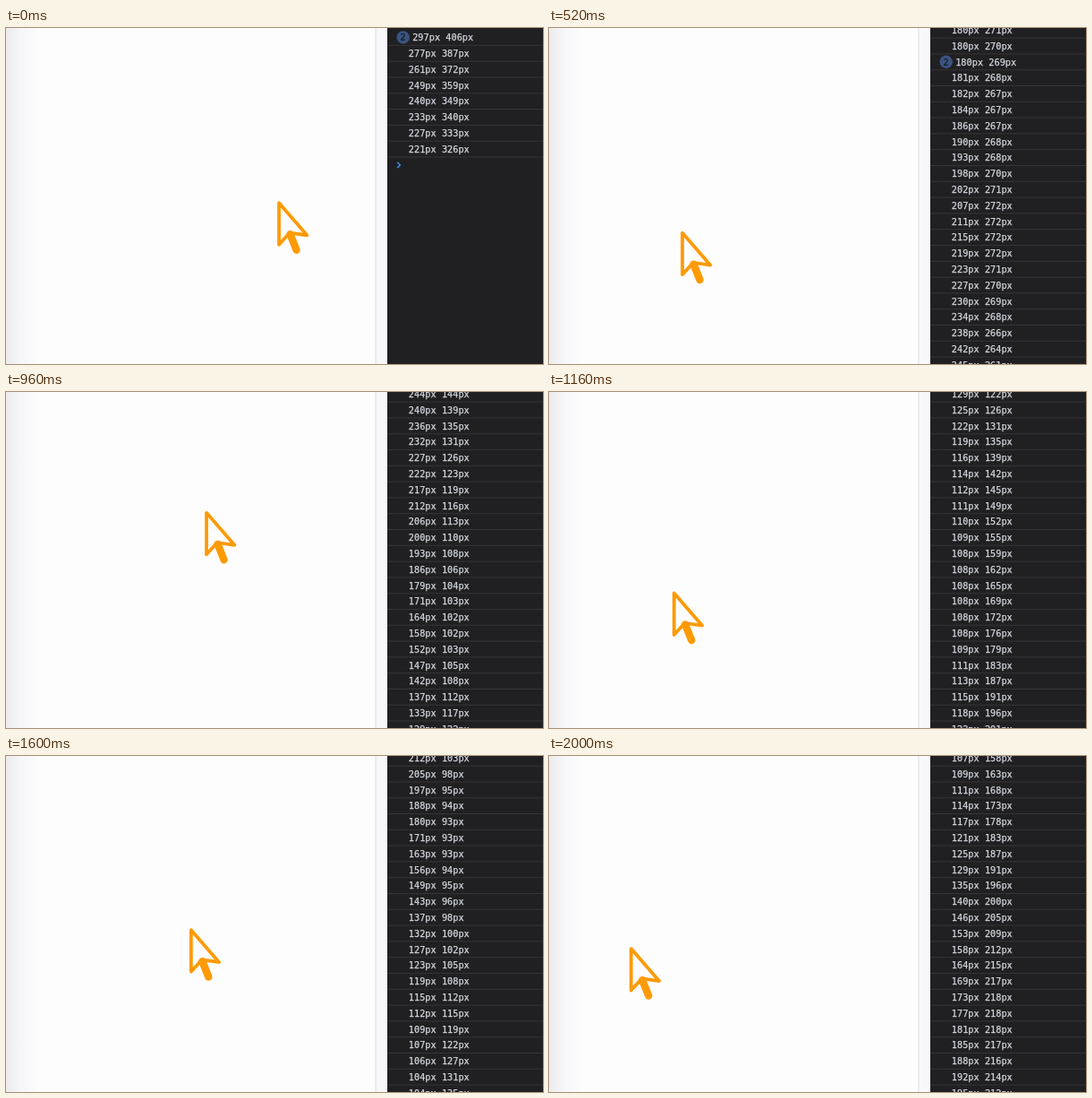
Write an HTML page that moves like this. It is 600x375 px and loops after 2240 ms.

```html
<!DOCTYPE html>
<html lang="en">
<head>
<meta charset="utf-8">
<title>Pointer log</title>
<style>
  html, body { margin: 0; width: 100%; height: 100%; overflow: hidden; background: #fefdfe; }
  svg { display: block; width: 600px; height: 375px; }
  text {
    font: 10.28px "DejaVu Sans Mono", "Liberation Mono", monospace;
    fill: #d3d7df; stroke: #d3d7df; stroke-width: .25; white-space: pre;
  }
  .badge text { fill: #18202e; stroke: none; font-weight: bold; text-anchor: middle; }
</style>
</head>
<body>
<svg viewBox="0 0 600 375">
  <defs>
    <linearGradient id="shade">
      <stop offset="0" stop-color="#ebeaec"/>
      <stop offset=".4" stop-color="#f6f5f7"/>
      <stop offset="1" stop-color="#fefdfe"/>
    </linearGradient>
  </defs>
  <rect width="600" height="375" fill="#fefdfe"/>
  <rect width="40" height="375" fill="url(#shade)"/>
  <rect x="413" width="14" height="375" fill="#f8f7f9"/>
  <rect x="412.5" width="1" height="375" fill="#dcdbdd"/>
  <g id="cursor" stroke="#fe9a04" stroke-linecap="round" stroke-linejoin="round">
    <path d="M1.5 2 L32.8 38 L13.5 35.3 L1.5 48.5 Z" fill="#fefdfe" stroke-width="3.8"/>
    <path d="M14 37 L21 54.5" fill="none" stroke-width="8.4"/>
  </g>
  <rect x="426" width="174" height="375" fill="#201f22"/>
  <g id="log"></g>
  <path id="prompt" d="M-1.6 -3.2 L1.6 0 L-1.6 3.2" fill="none" stroke="#3f84dc" stroke-width="1.6"/>
</svg>
<script>
const LOOP = 2240, LAST = 2000, STEP = 40;
const ROW = 17.8, ROWS = 23, SPACING = 8;

// Key points (top, left) of the circling pointer, SPACING events apart, after a lead-in point.
const path = [
  [585, 654], [297, 406], [215, 318], [183, 278], [184, 267], [215, 272], [245, 261],
  [269, 224], [267, 187], [244, 144], [206, 113], [152, 103], [119, 135],
  [108, 162], [115, 191], [153, 229], [222, 234], [262, 182], [212, 103],
  [149, 95], [112, 115], [104, 149], [125, 187], [169, 217], [199, 210],
  [232, 184], [258, 122], [247, 82], [221, 86]
];

// Time in ms and the number of pointer events by then.
const pace = [[0, 9], [320, 40], [520, 64], [800, 93], [1160, 132.5], [1600, 186], [2000, 213]];
const repeated = new Set([0, 21]);

const knot = i => path[Math.min(Math.max(i + 1, 0), path.length - 1)];

// Catmull-Rom curve through the key points.
function along(event) {
  const i = Math.floor(event / SPACING), u = event / SPACING - i;
  const [a, b, c, d] = [-1, 0, 1, 2].map(j => knot(i + j));
  return [0, 1].map(k => b[k] + u / 2 * (c[k] - a[k] + u * (
    2 * a[k] - 5 * b[k] + 4 * c[k] - d[k] + u * (3 * (b[k] - c[k]) + d[k] - a[k]))));
}

function eventsBy(t) {
  const i = Math.max(1, pace.findIndex(([time]) => time >= t));
  const [[t0, n0], [t1, n1]] = [pace[i - 1], pace[i]];
  return n0 + (n1 - n0) * (t - t0) / (t1 - t0);
}

function add(parent, tag, attrs = {}, content = "") {
  const el = document.createElementNS("http://www.w3.org/2000/svg", tag);
  for (const name in attrs) el.setAttribute(name, attrs[name]);
  el.textContent = content;
  return parent.appendChild(el);
}

const log = document.getElementById("log");
const cursor = document.getElementById("cursor");
const prompt = document.getElementById("prompt");

const rows = Array.from({ length: ROWS }, () => {
  const group = add(log, "g");
  add(group, "rect", { x: 426, y: 8.4, width: 174, height: 1, fill: "#353438" });
  const badge = add(group, "g", { class: "badge" });
  add(badge, "circle", { cx: 443.7, cy: 0, r: 7.2, fill: "#3b5380" });
  add(badge, "text", { x: 443.7, y: 3.7 }, "2");
  return { group, badge, label: add(group, "text", { y: 3.7 }) };
});

function place(el, x, y) {
  el.setAttribute("transform", `translate(${x.toFixed(2)} ${y.toFixed(2)})`);
}

function draw(t) {
  const event = eventsBy(t);
  const [top, left] = along(event);
  place(cursor, 0.937 * left + 12.6, 0.937 * top - 2);

  // The log runs past the stage, so it scrolls late and falls slowly behind.
  const scroll = Math.floor(0.96 * event - 42);
  const first = Math.max(0, scroll);
  const y = scroll < 0 ? 10.5 : 2.2;
  const count = Math.floor(event) - 1;
  rows.forEach(({ group, badge, label }, i) => {
    const index = first + i, double = repeated.has(index);
    group.style.display = index < count ? "" : "none";
    badge.style.display = double ? "" : "none";
    label.setAttribute("x", double ? 454.2 : 449.8);
    label.textContent = along(index).map(v => Math.round(v) + "px").join(" ");
    place(group, 0, y + i * ROW);
  });
  place(prompt, 438.8, y + (count - first) * ROW);
}

const start = performance.now();
function tick() {
  const t = (performance.now() - start) % LOOP;
  draw(Math.min(LAST, Math.floor(t / STEP) * STEP));
  requestAnimationFrame(tick);
}
tick();
</script>
</body>
</html>
```
